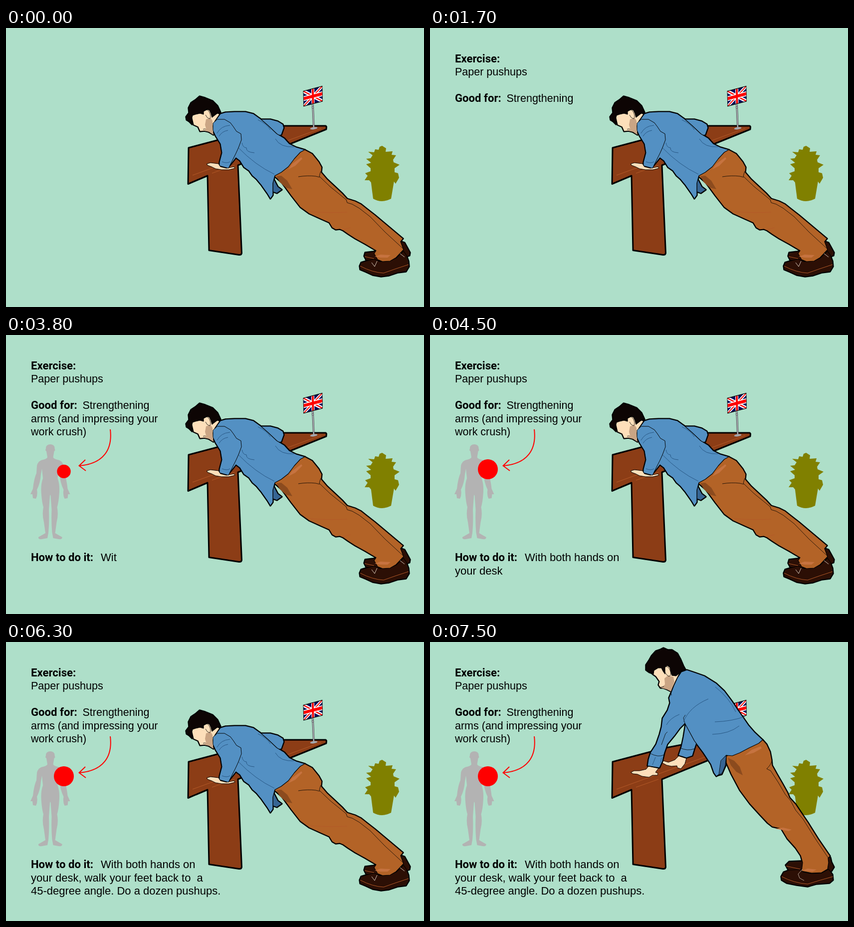
These frames come from a looping animation (838 px wide and 559 px high, 8 s). An HTML page:

```html
<!DOCTYPE html>
<html lang="en">
<head>
<meta charset="utf-8">
<title>Paper pushups</title>
<style>
  html, body { margin: 0; width: 100%; height: 100%; overflow: hidden; background: #aedfc9; }
  svg { display: block; width: 100%; height: 100%; }
  text { white-space: pre; fill: #000; }
  .head { font: 700 22.1px Roboto, sans-serif; }
  .body { font: 21.5px "Liberation Sans", Arial, sans-serif; }
  .how { font: 22px "Liberation Sans", Arial, sans-serif; }
  .ink { stroke: #000; stroke-linejoin: round; stroke-linecap: round; }
  .outline { stroke-width: 3.4; }
  .edge { stroke-width: 1.2; }
  .line { fill: none; stroke: #000; stroke-width: .8; stroke-linejoin: round; }
  .fold { fill: none; stroke: #1d4a75; stroke-width: .8; }
  .shirt { fill: #5390c3; }
  .under { fill: #376593; }
  .trousers { fill: #b36327; }
  .shoe { fill: #2c0f05; }
  .skin { fill: #fddfba; }
  .hair { fill: #0d0504; }
  .beard { fill: #caa584; }
  .pocket { fill: #8c4b1e; }
  .shine { fill: #c67340; }
  .seam { fill: none; stroke: #b45a28; stroke-width: 1; }
</style>
</head>
<body>
<svg viewBox="0 0 838 559">
  <defs>
    <g id="desk">
      <path class="ink" fill="#8c3d16" stroke-width="3" d="M366 240L470 212.500L556 196H641L642.500 198L642 203L558 237L465 275L472.500 451Q472 455 467 454.500L407 445.500L404 296L365 312.500Z"/>
      <path class="seam" stroke-width="1.6" d="M374 295L632 201M413 291L458 275"/>
    </g>

    <g id="lean">
      <polygon class="shirt" points="510,183 530,183 545,187 555,193 557,200 552,214 540,216"/>
      <polygon class="under" points="535,299 545,318 553,324 543,331 535,328"/>
      <polygon class="shoe" points="718,457 720,450 737,448 775,440 790,427 799,430 804,439 810,450 809,456 795,461 770,468 722,465"/>
      <polygon class="shoe" points="709,477 712,470 722,467 738,463 750,468 768,467 782,461 797,447 802,454 807,467 808,478 802,488 786,490 768,496 752,498 735,495 722,489 710,484"/>
      <polygon class="trousers" points="599,244 614,252 627,268 633,279 632,289 644,303 659,317 674,331 684,342 700,347 712,353 722,361 740,375 765,396 796,422 791,428 797,444 782,460 770,467 755,468 745,464 738,452 742,446 720,433 700,422 686,413 676,406 669,403 661,404 654,400 648,390 630,382 608,372 590,359 572,336 553,310 538,297 560,270 580,250"/>
      <polygon class="shirt" points="430,172 440,169 458,168 480,168 496,172 510,182 525,195 543,212 558,221 568,232 582,239 599,244 590,249 578,262 566,278 552,289 539,296 535,311 535,335 530,342 524,332 512,315 502,303 494,296 487,286 477,279 469,266 461,260 453,270 444,281 428,276 428,269 433,250 430,232 420,216 415,205 415,191 424,180"/>
      <polygon class="skin" points="372,177 378,169 396,167 410,160 428,173 419,186 415,196 416,214 406,208 398,206 389,207 385,198 376,194"/>
      <polygon class="hair" points="362,184 361,178 367,170 366,160 371,150 380,144 388,137 399,140 414,146 424,156 430,169 422,172 413,179 411,171 408,165 402,162 396,166 396,173 389,171 380,173 374,175 372,182 373,193 367,187"/>
    </g>

    <g id="raised">
      <polygon class="shirt" points="512,165 508,190 504,209 498,227 514,232 526,228 530,215 535,200"/>
      <polygon class="under" points="594,228 593,247 585,265 574,268 580,240"/>
      <polygon class="shoe" points="713,447 720,440 743,439 775,440 795,430 803,432 805,441 810,451 805,459 780,464 720,460"/>
      <polygon class="shoe" points="704,470 709,461 720,457 743,456 748,461 765,464 785,463 799,455 807,466 808,477 801,483 788,484 774,485 757,490 735,487 715,483 705,477"/>
      <polygon class="trousers" points="667,196 675,205 682,220 685,236 686,247 696,265 707,284 717,302 721,312 733,325 743,340 758,362 778,394 802,429 798,433 799,442 797,455 785,462 765,463 745,459 747,442 743,428 733,413 716,394 704,374 686,370 677,363 661,346 641,324 621,297 604,265 594,242 594,229 630,210"/>
      <polygon class="shirt" points="504,60 515,56 530,61 550,68 574,83 590,98 605,118 617,136 629,153 638,166 651,181 667,196 659,203 640,212 621,222 606,228 594,227 585,237 582,248 580,265 574,269 569,262 563,245 548,222 530,198 511,163 501,173 490,188 476,205 470,222 466,239 460,252 436,248 438,235 442,222 453,205 460,185 464,170 466,153 476,137 481,122 479,112 484,100 489,87 496,72"/>
      <polygon class="skin" points="444,56 464,49 480,45 498,60 502,59 494,75 483,99 475,95 467,92 462,92 458,86 460,79 453,69 446,64"/>
      <polygon class="hair" points="433,56 433,46 439,37 444,28 453,18 462,15 468,12 477,16 485,16 496,23 502,34 508,48 512,55 504,57 498,64 493,68 485,67 483,60 481,51 476,47 471,50 471,64 467,58 464,52 457,52 449,57 448,64 440,61"/>
    </g>

    <path id="halfBody" d="M89.500 219Q80 219 80 227L79 231L81 233L82 239L83 245Q82 248 74 250Q64 252 62 262L61 277Q56 288 54 308L49 319L53 319L54 327L60 328Q64 320 62 310Q69 296 70 279L72 268L74 287Q69 301 71 320Q72 335 75 345Q72 360 76 375L79 397L65 405Q64 410 72 409L83 407L85 396Q87 375 86 350L88 322L89.500 318Z"/>
  </defs>

  <g id="plant" fill="#808000">
    <path d="M730 295L736 342Q753 352 772 342L780 295Z"/>
    <polygon points="754,236 762,241 761,248 775,247 773,254 782,255 776,264 777,269 789,274 779,281 779,289 786,291 788,300 781,312 776,305 768,311 758,305 748,313 740,305 736,314 728,305 719,305 725,296 720,291 731,287 731,281 722,273 732,270 722,262 731,261 735,255 726,248 738,249 740,243 747,244 749,238"/>
  </g>

  <g id="poseLow">
    <use href="#desk"/>
    <use href="#lean" class="ink outline"/>
    <use href="#lean" class="ink edge"/>
    <polygon class="beard" points="401,183 410,180 414,186 414,205 416,214 407,208 398,206 401,201 399,194"/>
    <path class="line" d="M396 166Q403 160 408 169Q412 178 408 182Q402 180 400 174M395 203L400 202"/>
    <polygon class="skin ink" stroke-width="1" points="403,272 410,270 426,272 430,278 442,281 457,278 459,281 447,284 432,284 420,282 412,278 404,275"/>
    <polygon class="shirt ink" stroke-width="1" points="424,183 438,183 450,190 456,198 462,207 471,212 472,224 466,240 461,251 454,265 446,281 428,276 428,269 433,250 430,232 420,216 415,205 415,191"/>
    <path class="fold" d="M423 211Q431 196 449 195M427 217Q433 207 445 205M433 268Q443 272 449 268M466 240Q500 275 538 293M473 230Q475 240 482 240Q481 249 498 250M505 184Q523 192 530 204M540 222Q550 240 578 238"/>
    <path class="line" d="M586 298Q605 295 621 297L629 299M631 287L628 297L650 318L682 344L684 350L694 353L708 361L730 378L760 409L797 443"/>
    <polygon class="pocket" points="542,297 552,296 564,306 574,323 561,320 549,309"/>
    <polygon class="shine" points="566,283 574,272 592,259 594,262 580,276"/>
    <polygon class="shine" points="739,458 751,454 771,455 765,460 751,460"/>
    <path class="seam" d="M610 368Q650 371 684 369M675 404L691 400M710 477Q735 490 757 491Q782 482 807 474M719 458L738 462"/>
    <path fill="none" stroke="#d8c9b8" d="M733 470L739 478L744 467M790 452L799 459"/>
  </g>

  <g id="flag">
    <path d="M615 153L617 201" stroke="#333" stroke-width="3.600"/>
    <path d="M615 153L617 201" stroke="#aeb0b8" stroke-width="2.200"/>
    <circle cx="615" cy="159" r="2" fill="#aeb0b8" stroke="#333" stroke-width=".6"/>
    <ellipse cx="617" cy="201" rx="7.500" ry="2.300" transform="rotate(-8 617 201)" fill="#a5a7ae"/>
    <clipPath id="cloth"><path d="M0 0H60V30H0Z"/></clipPath>
    <g transform="matrix(.633 -.167 .02 1.010 596 126.500)">
      <g clip-path="url(#cloth)" fill="none">
        <path d="M0 0H60V30H0Z" fill="#0a0a5c"/>
        <path d="M0 0L60 30M60 0L0 30" stroke="#fff" stroke-width="7"/>
        <path d="M0 0L60 30M60 0L0 30" stroke="#f00" stroke-width="2.400"/>
        <path d="M30 0V30M0 15H60" stroke="#fff" stroke-width="9.500"/>
        <path d="M30 0V30M0 15H60" stroke="#f00" stroke-width="6"/>
      </g>
      <path d="M0 0H60V30H0Z" fill="none" stroke="#000" stroke-width="1.200"/>
    </g>
  </g>

  <g id="poseHigh">
    <use href="#desk"/>
    <polygon class="skin ink" stroke-width="1" points="462,240 468,238 478,241 491,236 500,227 514,233 511,244 503,254 496,252 495,248 484,249 475,247"/>
    <use href="#raised" class="ink outline"/>
    <use href="#raised" class="ink edge"/>
    <polygon class="under ink" stroke-width=".8" points="594,227 592,247 586,262 579,266 583,238"/>
    <polygon class="beard" points="470,73 477,67 488,70 490,80 483,99 475,95 464,92 471,85"/>
    <path class="line" d="M470 51Q477 46 481 56Q485 67 479 69Q473 66 471 60M461 91L469 89"/>
    <polygon class="skin ink" stroke-width="1" points="403,261 409,258 420,258 433,255 438,249 458,253 452,261 457,263 456,267 446,267 439,271 425,269 416,265 407,264"/>
    <path class="line" d="M483 100L484 107M511 163L508 152L512 146M464 206L472 184L476 180M441 223Q458 232 469 226M501 212Q516 219 530 214"/>
    <path class="fold" d="M508 160Q520 130 558 114M572 90Q600 112 613 140M571 160Q605 159 632 149M474 166Q482 152 500 145M446 246L452 231M462 242L464 232M566 185Q600 184 620 168"/>
    <path class="line" d="M686 236Q684 246 675 254L683 258L698 281L712 305L723 318L733 337L748 355L773 395L798 432"/>
    <polygon class="pocket" points="597,232 610,238 621,250 627,267 614,260 603,247"/>
    <polygon class="shine" points="631,227 645,216 663,209 665,213 649,222"/>
    <polygon class="shine" points="692,374 708,372 725,376 719,379"/>
    <polygon class="shine" points="745,458 757,454 775,456 767,460"/>
    <path class="seam" d="M705 470Q730 483 757 485Q782 477 808 470M714 449L742 455"/>
    <path fill="none" stroke="#d8c9b8" stroke-width=".8" d="M747 455L738 465L741 473L750 478"/>
  </g>

  <g id="aids">
    <g fill="#b3b3b3">
      <use href="#halfBody"/>
      <use href="#halfBody" transform="matrix(-1 0 0 1 177.500 0)"/>
    </g>
    <path fill="none" stroke="#f00" stroke-width="2" d="M209 189C214 230 195 258 147 262M159 250L146.500 262L160 272"/>
    <circle id="spot" cx="116" fill="#f00"/>
  </g>
  <g id="copy"></g>
</svg>
<script>
const LOOP = 8000, STEP = 100;
const $ = id => document.getElementById(id);

// Each block types at `rate` letters per step; lines are [first letter, x, y, style, text].
const blocks = [
  { start: 0, rate: 2.83, lead: .9, lines: [
    [0, 50, 69, 'head', 'Exercise:'],
    [10, 50, 95, 'body', 'Paper pushups'],
    [25, 50, 148, 'head', 'Good for:'],
    [36, 153.5, 148, 'body', 'Strengthening'],
    [50, 50, 174.5, 'body', 'arms (and impressing your'],
    [77, 50, 201, 'body', 'work crush)']
  ] },
  { start: 3300, rate: 3.64, lead: .3, lines: [
    [0, 50, 453, 'head', 'How to do it:'],
    [15, 190, 453, 'how', 'With both hands on'],
    [34, 50, 479.5, 'how', 'your desk, walk your feet back to  a'],
    [71, 50, 506, 'how', '45-degree angle. Do a dozen pushups.']
  ] }
];

for (const block of blocks) {
  block.nodes = block.lines.map(([, x, y, style]) => {
    const node = document.createElementNS('http://www.w3.org/2000/svg', 'text');
    node.setAttribute('x', x);
    node.setAttribute('y', y);
    node.setAttribute('class', style);
    return $('copy').appendChild(node);
  });
}

function type({ start, rate, lead, lines, nodes }, time) {
  const step = Math.floor((time - start) / STEP);
  const count = step > 0 ? Math.floor(step * rate + lead) : 0;
  lines.forEach(([first, , , , text], i) => {
    const shown = text.slice(0, Math.max(0, count - first));
    if (nodes[i].textContent !== shown) nodes[i].textContent = shown;
  });
}

function show(id, opacity) {
  $(id).style.opacity = opacity;
  $(id).style.display = opacity ? '' : 'none';
}

function draw(time) {
  blocks.forEach(block => type(block, time));

  show('aids', time >= 3400 ? 1 : 0);
  const size = Math.min(1, Math.max(0, Math.floor((time - 3300) / STEP) * .137));
  $('spot').setAttribute('r', 20 * size);
  $('spot').setAttribute('cy', 283 - 14 * size);

  const blend = time < 7400 ? 0 : time < 7500 ? .5 : 1;
  show('poseLow', 1 - blend);
  show('poseHigh', blend);
}

let origin;
function tick(now) {
  origin ??= now;
  draw((now - origin) % LOOP);
  requestAnimationFrame(tick);
}
draw(0);
requestAnimationFrame(tick);
</script>
</body>
</html>
```
